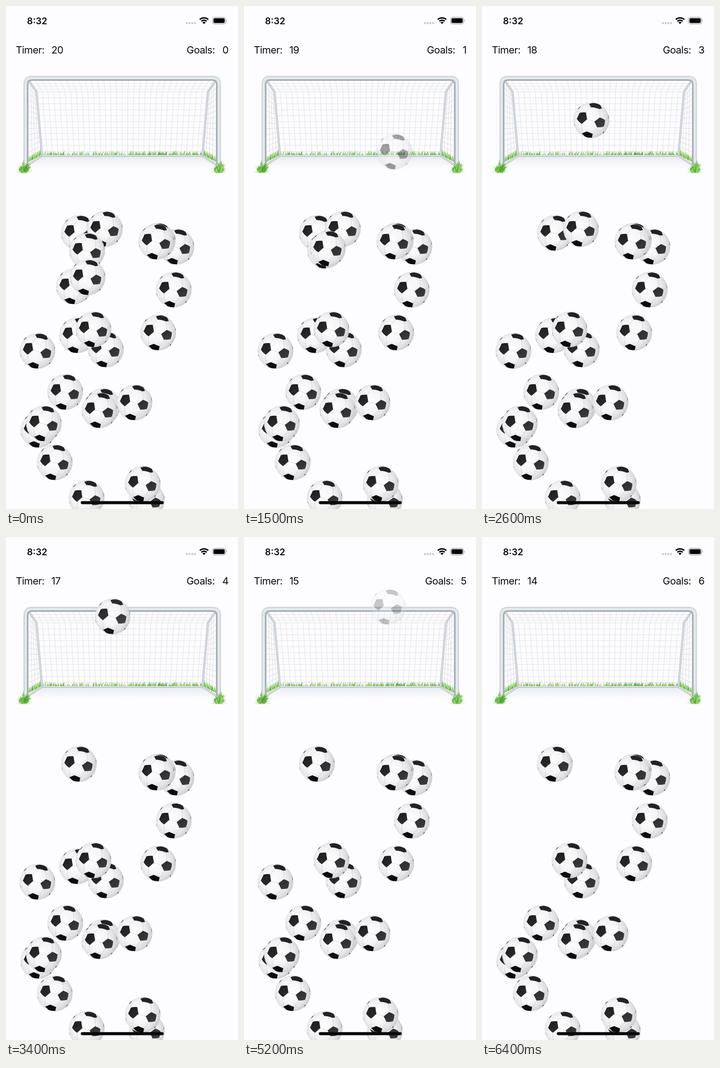
These frames come from a looping animation (509 by 1101 pixels, 6500 ms). An HTML page:

```html
<!DOCTYPE html>
<html lang="en">
<head>
<meta charset="utf-8">
<title>Ball game</title>
<style>
html, body { margin: 0; width: 100%; height: 100%; overflow: hidden; background: #fdfcfe; }
svg { display: block; width: 100%; height: 100%; }
text { font-family: Inter, Roboto, sans-serif; fill: #0b0b0c; }
.label { font-size: 22px; letter-spacing: -.6px; }
.clock { font-size: 20px; font-weight: 600; }
</style>
</head>
<body>
<svg viewBox="0 0 509 1101" xmlns="http://www.w3.org/2000/svg">
  <defs>
    <radialGradient id="skin" cx=".42" cy=".45" r=".62">
      <stop offset="0" stop-color="#fff"/>
      <stop offset=".5" stop-color="#f5f4f6"/>
      <stop offset=".8" stop-color="#e0dfe2"/>
      <stop offset="1" stop-color="#c4c3c7"/>
    </radialGradient>
    <linearGradient id="patch" x1="0" y1="0" x2="1" y2="1">
      <stop offset="0" stop-color="#1c1c1e"/>
      <stop offset="1" stop-color="#3c3b3e"/>
    </linearGradient>
    <linearGradient id="shade" x1="0" y1="0" x2="0" y2="1">
      <stop offset="0" stop-color="#e6eaf2"/>
      <stop offset="1" stop-color="#fdfcfe" stop-opacity="0"/>
    </linearGradient>
    <radialGradient id="turf">
      <stop offset="0" stop-color="#7cb656" stop-opacity=".8"/>
      <stop offset="1" stop-color="#c9e2b8" stop-opacity="0"/>
    </radialGradient>
    <clipPath id="disc"><circle r="38.6"/></clipPath>
    <g id="ball">
      <circle r="38.8" fill="url(#skin)" stroke="#cfced2" stroke-width=".6"/>
      <path d="M-10-2L7 3M-12-17L-3-28M19-6L18-25M-22 7L-20 29M13 16L3 31M30 0L38-6M27 14L33 22M-32-4L-38 2M-26-17L-30-25"
        fill="none" stroke="#b9b8bc" stroke-width=".8" stroke-dasharray="1.6 1"/>
      <g clip-path="url(#disc)">
        <path d="M-32-3L-26-16Q-19-18-12-17L-9.500-2L-21 8Q-27 5-32-3ZM6.500 3L18.500-6Q25-4 30 0Q30 7 27 14Q20 16 12.500 15.500Z" fill="url(#patch)"/>
        <path d="M-5-35.500Q9-41 20-32.500L23-25.500L17-24.500Q8-28.500-1-28.500Z" fill="#222224"/>
        <path d="M-21 29L-10 24.500L3 30L1 39L-12 37.500Z" fill="#0c0c0d"/>
        <path d="M-31-25L-23-32L-25-28L-29-24ZM36-15L40-3L38-3ZM-40 5L-37 9L-36 15ZM27 25L30 27L23 33Z" fill="#1d1d1f"/>
      </g>
    </g>
  </defs>
  <rect width="509" height="1101" fill="#fdfcfe"/>

  <text class="clock" x="46" y="40">8:32</text>
  <g fill="#c9c9cc">
    <circle cx="396.800" cy="37.500" r="2.300"/><circle cx="402.800" cy="37.500" r="2.300"/>
    <circle cx="408.700" cy="37.500" r="2.300"/><circle cx="414.600" cy="37.500" r="2.300"/>
  </g>
  <g id="wifi" fill="none" stroke="#000"></g>
  <rect x="453.200" y="24.700" width="28.600" height="14.600" rx="4.600" fill="none" stroke="#9c9c9f" stroke-width="1.300"/>
  <rect x="455.200" y="26.700" width="24.600" height="10.600" rx="2.800"/>
  <path d="M483.300 29.500Q485.600 32 483.300 34.500Z" fill="#9c9c9f"/>

  <text class="label" x="21.500" y="104">Timer:</text>
  <text class="label" x="99.500" y="104" id="timer">20</text>
  <text class="label" x="488" y="104" text-anchor="end">Goals:<tspan id="goals" dx="16.500">0</tspan></text>

  <g id="goal" fill="none"></g>
  <g id="balls"></g>
  <rect x="164" y="1083.800" width="182" height="6.600" rx="3.300" fill="#09090a"/>
</svg>
<script>
const $ = id => document.getElementById(id);
const LOOP = 6500, STEP = 100, MOVE = 400, FADE = 650;

let seed = 7;
const rnd = (a, b) => {
  seed = (seed * 16807) % 2147483647;
  return a + (b - a) * seed / 2147483647;
};
const mix = (a, b, k) => a + (b - a) * k;
const line = (x1, y1, x2, y2) =>
  `M${x1.toFixed(1)} ${y1.toFixed(1)}L${x2.toFixed(1)} ${y2.toFixed(1)}`;
const stroke = (d, color, width, extra = '') =>
  `<path d="${d}" stroke="${color}" stroke-width="${width}" ${extra}/>`;
const mirror = s => s + `<g transform="matrix(-1 0 0 1 510 0)">${s}</g>`;

function drawWifi() {
  const s = Math.sin(.75), c = Math.cos(.75), x = 434.5, y = 39.6;
  const arc = r => `M${x - r * s} ${y - r * c}A${r} ${r} 0 0 1 ${x + r * s} ${y - r * c}`;
  $('wifi').innerHTML = stroke(arc(13.6), '#000', 3.2) + stroke(arc(8.6), '#000', 3.2) +
    `<path d="${arc(5.2)}L${x} ${y}Z" fill="#000" stroke="none"/>`;
}

const greens = ['#5db53a', '#8fd45f', '#a9df7c', '#439a28', '#75c64a'];
function blade(x, y, dx, h, w) {
  const color = greens[Math.floor(rnd(0, 5))], f = n => n.toFixed(1);
  return `<path d="M${f(x - w)} ${f(y)}Q${f(x)} ${f(y - h * .6)} ${f(x + dx)} ${f(y - h)}Q${f(x + w)} ${f(y - h * .5)} ${f(x + w)} ${f(y)}Z" fill="${color}"/>`;
}

// Blades fan out from a rounded clump
function tuft(cx) {
  let s = `<ellipse cx="${cx}" cy="363" rx="20" ry="5" fill="url(#turf)"/>` +
    `<ellipse cx="${cx}" cy="358" rx="11" ry="7" fill="#5db53a"/>`;
  for (let i = 0; i < 110; i++) {
    const a = rnd(-1.45, 1.45), r = rnd(10, 17);
    s += blade(cx + Math.sin(a) * 6, rnd(358, 365), Math.sin(a) * r * .8, 3 + Math.cos(a) * r, 1.1);
  }
  return s;
}

function drawGoal() {
  let back = '', side = '', grass = '', edge = '';
  for (let i = 0; i <= 30; i++) {
    const k = i / 30, top = mix(67, 443, k);
    back += line(mix(52, 458, k), 164, top, 188) + line(top, 188, mix(79, 431, k), 326);
  }
  for (let i = 0; i <= 10; i++) {
    const y = 188 + i * 13, inset = (y - 188) * 12 / 140;
    back += line(67 + inset, y, 443 - inset, y);
  }
  for (const k of [.25, .5, .75])
    back += line(mix(52, 67, k), mix(164, 188, k), mix(458, 443, k), mix(164, 188, k));
  for (let i = 0; i <= 14; i++) {
    const k = i / 14;
    side += line(50, mix(167, 345, k), mix(67, 79, k), mix(188, 326, k));
  }
  for (const k of [.25, .5, .75])
    side += line(mix(50, 67, k), mix(165, 188, k), mix(50, 79, k), mix(345, 327, k));

  for (let i = 0; i < 280; i++)
    grass += blade(rnd(80, 430), 327, rnd(-5, 5), rnd(5, 11), .9);
  for (let i = 0; i < 60; i++) {
    const k = rnd(0, 1);
    edge += blade(mix(37, 77, k), mix(348, 326, k), rnd(-3, 4), rnd(5, 18), .9);
  }
  const rear = 'M50 163L67 188L79 328L47 349';
  const tube = o => `M${44 + o} 347V${170 + o}Q${44 + o} ${158.5 + o} ${56 + o} ${158.5 + o}H${454 - o}Q${466 - o} ${158.5 + o} ${466 - o} ${170 + o}V347`;
  $('goal').innerHTML =
    '<path d="M79 330H431L462 350V362H48V350Z" fill="url(#shade)"/>' +
    stroke(back, '#dcdee4', .9) + mirror(stroke(side, '#d0d4db', .8)) + grass + mirror(edge) +
    mirror(stroke(rear, '#b0b7c1', 4.2, 'stroke-linejoin="round"') + stroke(rear, '#e5e9ef', 1.8)) +
    stroke('M78 328H432', '#b0b7c1', 4.2) + stroke('M79 327.5H431', '#e9edf2', 1.8) +
    stroke(tube(0), '#bcc4cb', 11) + stroke(tube(-1), '#d3dae0', 7.5) +
    stroke(tube(-.8), '#e9edf0', 3) + stroke(tube(3.4), '#9ca6b0', 2.2) +
    tuft(39) + tuft(467);
}

// Resting centres, back to front
const spots = [
  [160, 497], [217, 488], [178, 536], [149, 614], [179, 594], [374, 527], [333, 514], [330, 516],
  [368, 621], [334, 715], [156, 721], [219, 752], [192, 708], [69, 755], [130, 845], [212, 876],
  [205, 885], [282, 868], [71, 928], [83, 914], [107, 999], [177, 1077], [309, 1082], [300, 1046]
];
// Ball index, launch time, target
const shots = [
  [4, 720, 330, 319], [3, 1400, 289, 282], [2, 2190, 240, 250],
  [1, 2970, 234, 174], [10, 4310, 316, 153], [13, 5200, 250, 220]
];

drawWifi();
drawGoal();
$('balls').innerHTML = spots.map(([x, y]) => `<use href="#ball" transform="translate(${x} ${y})"/>`).join('');
const balls = $('balls').children;

function render(t) {
  let goals = 0;
  for (const [i, start, tx, ty] of shots) {
    const [x, y] = spots[i];
    const k = Math.min(1, Math.max(0, (t - start) / MOVE));
    const fade = Math.min(1, Math.max(0, (t - start - MOVE) / FADE));
    if (k === 1) goals++;
    balls[i].setAttribute('transform', `translate(${mix(x, tx, k)} ${mix(y, ty, k)})`);
    balls[i].setAttribute('opacity', 1 - fade);
  }
  $('timer').textContent = 20 - Math.max(0, Math.floor((t + 100) / 1000));
  $('goals').textContent = goals;
}

function tick() {
  const t = performance.now() % LOOP;
  render(Math.floor(t / STEP) * STEP);
  requestAnimationFrame(tick);
}
tick();
</script>
</body>
</html>
```
